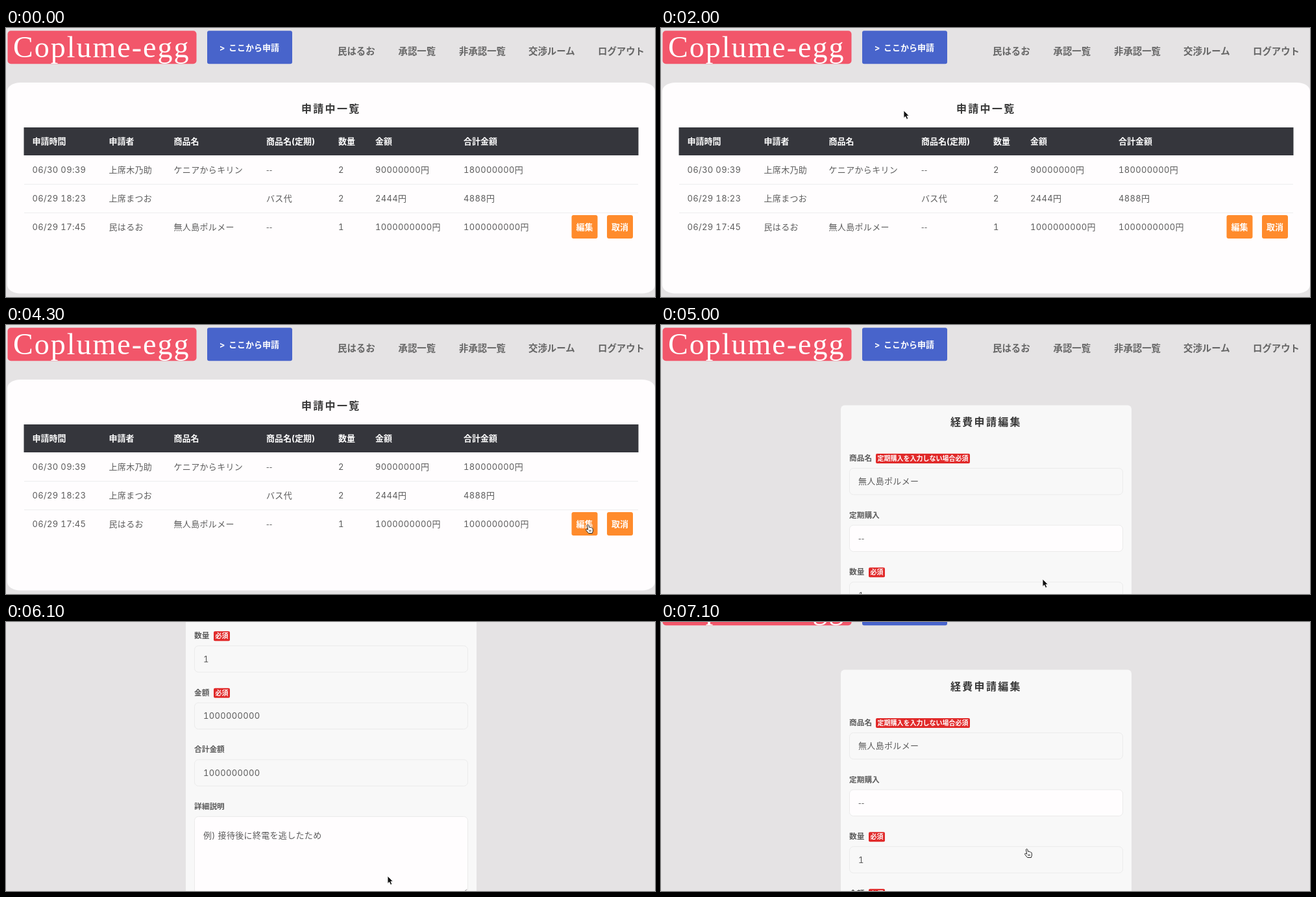
Animation, 1000 px wide and 414 px high, one loop 7.2 s. Source, as an HTML page:

```html
<!DOCTYPE html>
<html lang="ja">
<head>
<meta charset="utf-8">
<style>
html, body { margin: 0; height: 100%; overflow: hidden; background: #e5e3e4; }
svg { display: block; width: 100vw; height: 100vh; }
text {
  font: 13px Inter, "Noto Sans CJK JP", "Noto Sans CJK", sans-serif;
  font-variant-numeric: tabular-nums;
  letter-spacing: .33px;
  fill: #5c5c5c;
  white-space: pre;
}
.bold { font-weight: 700; letter-spacing: 0; }
.white { fill: #fff; }
.logo { font: 46px "Liberation Serif", serif; letter-spacing: 2px; }
.nav { font-size: 14.4px; font-weight: 700; letter-spacing: 0; fill: #666; }
.title { font-size: 16px; font-weight: 700; letter-spacing: 2.3px; fill: #383838; }
.label { font-size: 11.7px; }
.badge { font-size: 10px; }
.submit { font-size: 16px; letter-spacing: .6px; }
.dark { fill: #222; letter-spacing: 0; }
.dash { font-family: "Noto Sans CJK JP", "Noto Sans CJK", sans-serif; }
</style>
</head>
<body>
<svg viewBox="0 0 1000 414">
  <g id="page"><g id="header"></g><g id="list"></g><g id="form"></g></g>
  <g id="cursor">
    <path id="arrow" d="M0 0V11.5L2.6 9.2L4.6 13.4L6.8 12.4L4.9 8.3H8.3Z"
      fill="#111" stroke="#fff" stroke-width=".8"/>
    <path id="hand" d="M-1.6 1Q-.4 -.6 .7 1L1.7 4.5Q3 3.6 3.8 4.8Q5 4.2 5.6 5.4Q7 5.2 7.2 6.8L7.4 10L6.4 13.5H.6L-3.4 8.6Q-3.6 6.6 -1.6 7.4L-.3 8.2Z M2 8.5V11M4 8.5V11"
      fill="#fff" stroke="#222"/>
  </g>
</svg>
<script>
const $ = id => document.getElementById(id);
const text = (x, y, str, cls = '') =>
  `<text x="${x}" y="${y}" class="${str === '--' ? 'dash' : cls}">${str}</text>`;
const rect = (x, y, w, h, fill, rx = 0, stroke = 'none', ry = rx) =>
  `<rect x="${x}" y="${y}" width="${w}" height="${h}" rx="${rx}" ry="${ry}" fill="${fill}" stroke="${stroke}"/>`;

const USER = '民はるお', ITEM = '無人島ポルメー', PAPER = '#fffdfe';

$('header').innerHTML =
  rect(2.5, 4.3, 291, 51, '#f2566a', 5) + text(11, 45, 'Coplume-egg', 'logo white') +
  rect(310, 4.3, 131, 51, '#4864cb', 3) +
  text(329, 34.5, '&gt; ', 'bold white') + text(343, 34.5, 'ここから申請', 'bold white') +
  [[511, USER], [604.5, '承認一覧'], [698, '非承認一覧'], [805, '交渉ルーム'], [912, 'ログアウト']]
    .map(([x, str]) => text(x, 41, str, 'nav')).join('');

const columns = [40.5, 158.5, 258.5, 401, 512, 569, 705];
const row = (y, cells, cls) => cells.map((str, i) => text(columns[i], y, str, cls)).join('');
const action = (x, str) => rect(x, 288, 40, 36, '#ff8b2c', 3) + text(x + 7, 311, str, 'bold white');

$('list').innerHTML =
  rect(2, 84, 998, 324.5, PAPER, 20, 'none', 13) + text(455, 130, '申請中一覧', 'title') +
  rect(27.5, 153, 947, 43, '#35363c') +
  row(179, ['申請時間', '申請者', '商品名', '商品名(定期)', '数量', '金額', '合計金額'], 'bold white') +
  row(223, ['06/30 09:39', '上席木乃助', 'ケニアからキリン', '--', '2', '90000000円', '180000000円']) +
  row(266.8, ['06/29 18:23', '上席まつお', '', 'バス代', '2', '2444円', '4888円']) +
  row(310.6, ['06/29 17:45', USER, ITEM, '--', '1', '1000000000円', '1000000000円']) +
  rect(28, 240, 946, 1, '#ededee') + rect(28, 284, 946, 1, '#ededee') +
  action(871.5, '編集') + action(926, '取消');

const label = (y, str) => text(290, y, str, 'bold label');
const badge = (x, y, w, str) =>
  rect(x, y - 11, w, 15, '#e12a2a', 2) + text(x + 2.5, y - .2, str, 'bold badge white');
const field = (i, name, value, fill = '#f8f8f8', height = 40.5) => {
  const y = 209 + 87.6 * i;
  return label(y, name) + rect(290.5, y + 11.5, 421, height, fill, 6, '#ebebeb') +
    text(304, y + (height > 50 ? 45 : 36.3), value);
};

$('form').innerHTML =
  rect(277, 123.5, 448, 900, '#f8f8f8', 6) + text(446, 155, '経費申請編集', 'title') +
  field(0, '商品名', ITEM) + badge(331, 209, 145, '定期購入を入力しない場合必須') +
  field(1, '定期購入', '--', PAPER) +
  field(2, '数量', '1') + badge(320, 384.2, 25, '必須') +
  field(3, '金額', '1000000000') + badge(320, 471.8, 25, '必須') +
  field(4, '合計金額', '1000000000') +
  field(5, '詳細説明', '例) 接待後に終電を逃したため', PAPER, 118.5) +
  '<path d="M704 776.5L710 770.5M708 776.5L710 774.5" stroke="#777"/>' +
  label(813, '参考写真') +
  rect(290.5, 827.5, 105, 23.5, '#efefef', 2, '#767676') + text(297, 843.5, 'ファイルを選択', 'dark') +
  text(399, 843.5, '選択されていません') +
  rect(290, 898, 422, 49, '#1096d4', 5) + text(484, 931, '編集', 'bold submit white');

// Interpolates [time, ...values] keys with a smooth start and stop.
function tween(keys, t) {
  const next = keys.findIndex(key => key[0] > t);
  if (next < 0) return keys[keys.length - 1].slice(1);
  if (next === 0) return keys[0].slice(1);
  const a = keys[next - 1], b = keys[next];
  const p = (t - a[0]) / (b[0] - a[0]), ease = p * p * (3 - 2 * p);
  return a.slice(1).map((v, i) => v + (b[i + 1] - v) * ease);
}

const pointerKeys = [
  [500, 470, 425], [800, 450, 374], [1600, 420, 328], [2000, 374, 127], [2800, 374, 127],
  [4100, 897, 307], [4600, 897, 307], [5000, 588, 391], [6300, 588, 391], [6600, 564, 349]
];
const scrollKeys = [[5000, 0], [5500, 359], [6200, 359], [6400, 570]];

function draw(now) {
  const t = Math.floor(now / 100) * 100 % 7200;
  const editing = t >= 4700;
  const [x, y] = tween(pointerKeys, t);
  const scroll = t >= 7100 ? 50 : tween(scrollKeys, t)[0];
  const pointing = t >= 4000 && !editing || t >= 6500;
  const show = (id, on) => $(id).setAttribute('visibility', on ? 'visible' : 'hidden');
  show('list', !editing);
  show('form', editing);
  show('arrow', !pointing);
  show('hand', pointing);
  $('page').setAttribute('transform', `translate(0 ${-Math.round(scroll)})`);
  $('cursor').setAttribute('transform', `translate(${x} ${y})`);
  requestAnimationFrame(() => draw(performance.now()));
}
draw(0);
</script>
</body>
</html>
```
